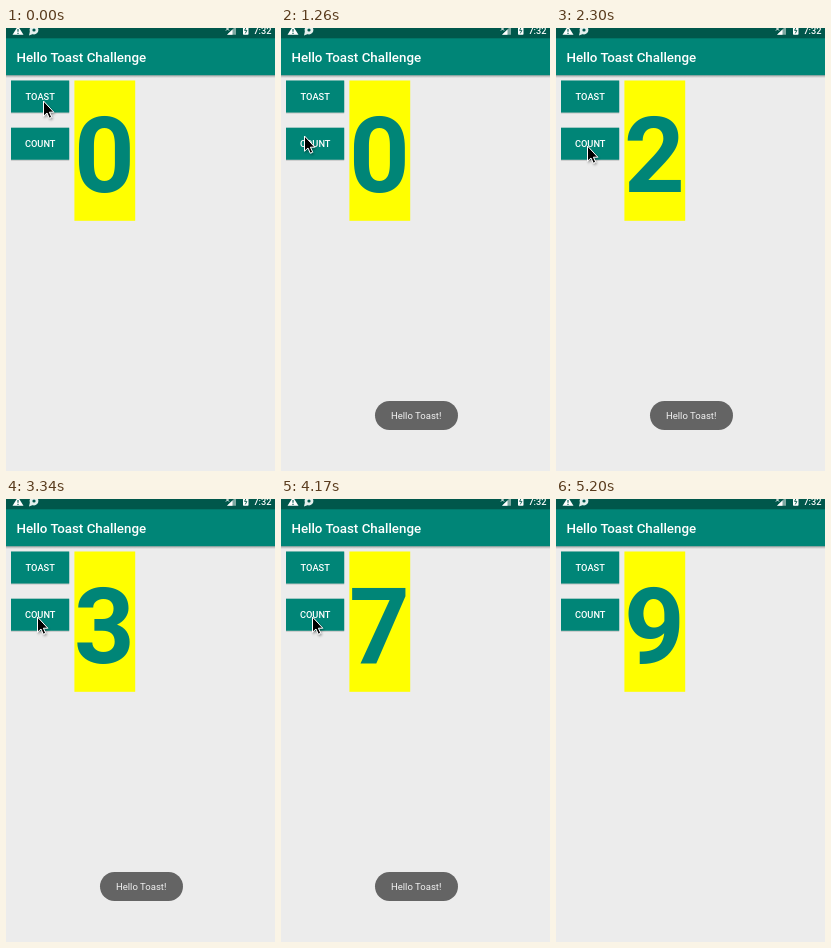
Animation of 269 by 443 pixels, one loop 5.88 s. Source, as an HTML page:

```html
<!DOCTYPE html>
<html lang="en">
<head>
<meta charset="utf-8">
<title>Hello Toast Challenge</title>
<style>
  html, body { margin: 0; width: 100%; height: 100%; overflow: hidden; background: #ececec; }
  svg { display: block; width: 269px; height: 443px; font-family: Roboto, sans-serif; }
  .medium { font-weight: 500; fill: #fff; }
  .middle { text-anchor: middle; }
</style>
</head>
<body>
<svg viewBox="0 0 269 443">
  <defs>
    <linearGradient id="shade" x2="0" y2="1">
      <stop stop-color="#000" stop-opacity=".32"/>
      <stop offset="1" stop-color="#000" stop-opacity="0"/>
    </linearGradient>
    <filter id="soft" x="-50%" y="-50%" width="200%" height="200%">
      <feDropShadow dx="1" dy="1.5" stdDeviation="1" flood-opacity=".35"/>
    </filter>
    <filter id="raised" x="-10%" y="-10%" width="120%" height="130%">
      <feDropShadow dx="0" dy=".6" stdDeviation=".6" flood-opacity=".3"/>
    </filter>
  </defs>

  <rect width="269" height="443" fill="#ececec"/>
  <rect y="47" width="269" height="3" fill="url(#shade)"/>
  <rect width="269" height="47.2" fill="#008577"/>
  <rect width="269" height="10.3" fill="#00574b"/>

  <!-- status bar -->
  <path d="M12-2 17.5 6.7H6.5Z" fill="#fff"/>
  <path d="M12 1V3.8M12 4.8V6" stroke="#00574b" stroke-width="1.1"/>
  <path d="M23 7.5 24 3 27 6Z" fill="#e4efed"/>
  <circle cx="28" cy="2" r="4.4" fill="#e4efed"/>
  <circle cx="28" cy="2" r="1.6" fill="#00574b"/>
  <path d="M230-2V6.7H221Z" fill="#7ea9a2"/>
  <path d="M226.5 1.5V6.7H221Z" fill="#fff"/>
  <path d="M220-.5 223 2.5M223-.5 220 2.5" stroke="#fff"/>
  <rect x="237" y="-3" width="5.5" height="9.7" rx=".7" fill="#fff"/>
  <path d="M240.3-1 238.6 2.4H240.9L239.3 5.4" fill="none" stroke="#00574b" stroke-width=".9"/>
  <text class="medium" x="247.4" y="6" font-size="9.2">7:32</text>

  <text class="medium" x="10.4" y="34" font-size="13.35">Hello Toast Challenge</text>

  <g filter="url(#raised)" fill="#008577">
    <rect x="5" y="52.5" width="58.2" height="32"/>
    <rect x="5" y="99.7" width="58.2" height="32"/>
  </g>
  <text class="medium middle" x="34.2" y="72.1" font-size="9.25">TOAST</text>
  <text class="medium middle" x="34.2" y="119.4" font-size="9.25">COUNT</text>

  <rect x="68.4" y="52.5" width="60.8" height="140.3" fill="#ff0"/>
  <text id="count" class="middle" x="98.3" y="163.8" font-size="106" font-weight="700" fill="#008577">0</text>

  <g id="toast">
    <rect x="94" y="373" width="83" height="29" rx="14.5" fill="#646464"/>
    <text class="middle" x="135.2" y="391.3" font-size="9.55" fill="#f2f2f2">Hello Toast!</text>
  </g>

  <path id="cursor" d="M1.5 0V15.2L5 12 7.3 17.2 9.7 16.2 7.4 11.2H11.8Z" stroke="#fff" stroke-linejoin="round" filter="url(#soft)"/>
</svg>
<script>
  const LOOP = 5880, TICK = 207.9; // the screen refreshes once per tick
  const onToast = [36, 73], onCount = [30, 118], exit = [212, 388];
  const slowClicks = [9, 11, 16], rapidFrom = 18;
  const leaveToast = 4, leaveCount = 21, gone = 25;

  const [count, toast, cursor] = ['count', 'toast', 'cursor'].map(id => document.getElementById(id));
  const clamp = (value, low, high) => Math.min(high, Math.max(low, value));

  // Eased hand movement that swings out to the left by `bow`.
  function sweep([x0, y0], [x1, y1], bow, ticks) {
    const p = 1 - Math.exp(-0.186 * Math.max(0, ticks) ** 3);
    return [x0 + (x1 - x0) * p - bow * p ** 1.5 * (1 - p), y0 + (y1 - y0) * p];
  }

  const cursorAt = tick => tick < leaveCount
    ? sweep(onToast, onCount, 62, tick - leaveToast)
    : sweep(onCount, exit, 104, tick - leaveCount);

  // A few single clicks, then one click per tick up to nine.
  const countAt = tick => tick < rapidFrom
    ? slowClicks.filter(click => click <= tick).length
    : Math.min(9, 5 + tick - rapidFrom);

  const toastAt = tick => Math.min(clamp((tick - 1) * 0.65, 0, 1), clamp((22.6 - tick) / 2, 0, 1));

  function draw() {
    const tick = Math.floor(performance.now() % LOOP / TICK);
    count.textContent = countAt(tick);
    toast.setAttribute('opacity', toastAt(tick));
    cursor.setAttribute('transform', `translate(${cursorAt(tick).map(Math.round)})`);
    cursor.setAttribute('visibility', tick < gone ? 'visible' : 'hidden');
    requestAnimationFrame(draw);
  }
  draw();
</script>
</body>
</html>
```
